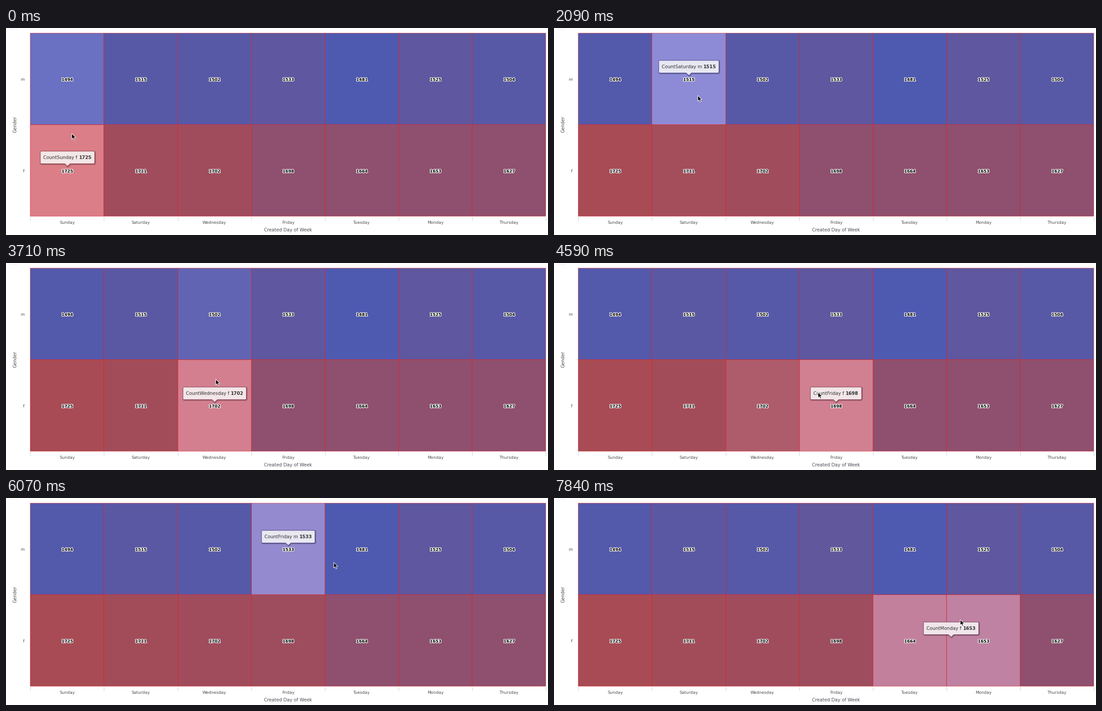
Recreate the animation shown at these times as a matplotlib script. Size 1208 by 463 pixels, loop 7.99 s.

```python
import math

import matplotlib.pyplot as plt
import numpy as np
from matplotlib import patheffects
from matplotlib.animation import FuncAnimation
from matplotlib.patches import Circle, Polygon, Rectangle
from matplotlib.textpath import TextPath

W, H, DPI = 1208, 463, 64
PX = 72 / DPI                      # points per pixel
LOOP, STEPS = 7990, 54             # the screen refreshes 54 times per loop
FRAMES, INTERVAL = 235, 34

DAYS = ["Sunday", "Saturday", "Wednesday", "Friday", "Tuesday", "Monday", "Thursday"]
ROWS = ["m", "f"]
COUNTS = [[1494, 1515, 1502, 1533, 1481, 1525, 1504],
          [1725, 1711, 1702, 1698, 1664, 1653, 1627]]
X0, DX = 54.2, 164.17
XS = np.round(X0 + DX * np.arange(8))
YS = [11.5, 216.3, 421]
RED = "#d8262f"
SIZE_TIP = 10.2
TIP_TOP, ROW_STEP = 72, 205

# pointer travel: start ms, duration ms, x, y
START, BEGIN = np.array([146.0, 190.0]), -500
LEGS = [(-500, 306, 146, 235), (0, 780, 258, 252), (1485, 200, 320, 150),
        (2230, 780, 445, 180), (3040, 530, 467, 259), (3860, 560, 588, 288),
        (4890, 700, 690, 143), (5931, 270, 770, 143), (6330, 700, 800, 258),
        (7455, 420, 907, 271)]
LAG, FADE, TICK = 60, 500, 22      # hover delay, fade-out and tooltip tick in ms
ARROW = np.array([(0, 0), (0, 12.6), (2.9, 9.9), (5, 14.6), (7.1, 13.7),
                  (5.1, 9.2), (9, 9.1)]) + (0.5, 1)


def rgb(code):
    return np.array([int(code[i:i + 2], 16) for i in (1, 3, 5)]) / 255


LOW, HIGH = rgb("#4e5ab0"), rgb("#a84b54")
BANDS, TONES = [0.08, 0.17, 0.5, 0.9], [0, 0.1, 0.19, 0.72, 0.91]


def level(col, row):
    return (COUNTS[row][col] - 1481) / (1725 - 1481)


def shade(amount):
    return LOW + (HIGH - LOW) * amount


def pointer_at(t):
    pos = START
    for begin, span, x, y in LEGS:
        u = min(max((t - begin) / span, 0), 1)
        pos = pos + (np.array([x, y]) - pos) * u * u * (3 - 2 * u)
    return pos


def find_hovers():
    """List (time, col, row) whenever the pointer enters another tile."""
    found = []
    for t in range(BEGIN, LOOP, 5):
        x, y = pointer_at(t)
        tile = (int(np.searchsorted(XS, x)) - 1, int(y > YS[1]))
        if not found or found[-1][1:] != tile:
            found.append((t + LAG, *tile))
    return found


HOVERS = find_hovers()


def mid_x(col):
    return X0 + DX * (col + 0.5) + 0.5


def label(x, y, text, size, colour, ha="center", **kw):
    return ax.text(x, y, text, fontsize=size * PX, color=colour, ha=ha,
                   family="DejaVu Sans", **kw)


def text_width(text, weight):
    prop = {"family": "DejaVu Sans", "weight": weight}
    return TextPath((0, 0), text, size=SIZE_TIP, prop=prop).get_extents().width


def tile_colour(col, row, t):
    """Coarse tone until first hovered, then bright, then fading back."""
    amount, glow = level(col, row), 0
    past = [h for h in HOVERS if h[0] <= t]
    visits = [i for i, h in enumerate(past) if h[1:] == (col, row)]
    if not visits:
        amount = TONES[np.digitize(amount, BANDS)]
    elif visits[-1] == len(past) - 1:
        glow = 1
    else:
        u = min((t - past[visits[-1] + 1][0]) / FADE, 1)
        glow = (1 + math.cos(math.pi * u)) / 2
    return np.clip(shade(amount) + 0.2 * glow, 0, 1)


def tip_centre(t):
    """Each tick covers a third of the way to the hovered tile."""
    pos = None
    ends = [h[0] for h in HOVERS[1:]] + [math.inf]
    for (start, col, row), end in zip(HOVERS, ends):
        if start > t:
            break
        goal = np.array([mid_x(col), TIP_TOP + ROW_STEP * row])
        if pos is None:
            pos = goal
        pos = goal + (pos - goal) * (2 / 3) ** ((min(t, end) - start) // TICK)
    return pos


def callout(x, y, w, h=28, r=1.5):
    right, low, mid = x + w, y + h, x + w / 2
    return np.array([(x + r, y), (right - r, y), (right, y + r), (right, low - r),
                     (right - r, low), (mid + 6, low), (mid, low + 5.5),
                     (mid - 6, low), (x + r, low), (x, low - r), (x, y + r)])


fig = plt.figure(figsize=(W / DPI, H / DPI), dpi=DPI, facecolor="white")
ax = fig.add_axes([0, 0, 1, 1])
ax.set_xlim(0, W)
ax.set_ylim(H, 0)
ax.axis("off")


def line(xs, ys, colour, **kw):
    ax.plot(xs, ys, color=colour, solid_capstyle="butt", **kw)


# tiles and their counts
tiles = {}
for row in range(2):
    for col in range(7):
        tile = Rectangle((XS[col], YS[row]), XS[col + 1] - XS[col],
                         YS[row + 1] - YS[row], lw=0, snap=False, zorder=1)
        tiles[col, row] = ax.add_patch(tile)
        label(mid_x(col), 118.4 + ROW_STEP * row, str(COUNTS[row][col]), 9.2, "black",
              weight="bold", zorder=4,
              path_effects=[patheffects.withStroke(linewidth=2.6 * PX, foreground="white")])

# borders and ticks
border = dict(lw=1.2 * PX, snap=False, zorder=2)
for x in XS:
    line([x, x], [YS[0], YS[2]], RED, alpha=0.9 if XS[0] < x < XS[-1] else 0.55, **border)
    line([x, x], [421.5, 430.5], "#c0d0e0", lw=PX)
for y in YS:
    line([XS[0], XS[-1]], [y, y], RED, alpha=0.9 if y == YS[1] else 0.55, **border)

# axis text
for col, day in enumerate(DAYS):
    label(mid_x(col) - 0.4, 438, day, 9.1, "#505050")
for row, name in enumerate(ROWS):
    label(41.3, 118.3 + ROW_STEP * row, name, 9.1, "#505050", ha="right")
label(628.8, 454.8, "Created Day of Week", 10.1, "#4d4d57")
label(20, 215, "Gender", 10.1, "#4d4d57", va="center", rotation=90)
for i in range(3):
    ax.add_patch(Circle((10.5 + 6 * i, 2.8), 0.7, color="#b4b4b4", lw=0))

# tooltip and pointer
shadows = [ax.add_patch(Polygon([(0, 0), (1, 1)], fill=False, ec="black", alpha=a,
                                lw=w * PX, joinstyle="round", zorder=5))
           for w, a in ((5, 0.07), (3, 0.14), (1, 0.2))]
box = ax.add_patch(Polygon([(0, 0), (1, 1)], lw=PX, zorder=6))
tip_name = label(0, 0, "", SIZE_TIP, "#333333", ha="left", zorder=7)
tip_count = label(0, 0, "", SIZE_TIP, "#333333", ha="left", weight="bold", zorder=7)
pointer = ax.add_patch(Polygon(ARROW, fc="black", ec="white", lw=PX, zorder=9))


def draw_tooltip(t, col, row):
    name, count = f"Count{DAYS[col]} {ROWS[row]}", str(COUNTS[row][col])
    pad, gap = 6.8, 4.2
    name_w = text_width(name, "normal")
    width = round(name_w + gap + text_width(count, "bold") + 2 * pad + 1.5)
    cx, cy = tip_centre(t)
    x, y = math.floor(cx - width / 2) + 0.5, round(cy) + 0.5
    shape = callout(x, y, width)
    for shadow in shadows:
        shadow.set_xy(shape + 1)
    box.set_xy(shape)
    box.set_facecolor((0.976, 0.976, 0.976, 0.85))
    box.set_edgecolor(shade(level(col, row)))
    tip_name.set_text(name)
    tip_name.set_position((x + pad, y + 17.3))
    tip_count.set_text(count)
    tip_count.set_position((x + pad + name_w + gap, y + 17.3))


def update(n):
    step = int((n * INTERVAL + 24) * STEPS / LOOP)
    t = step * LOOP / STEPS
    for (col, row), tile in tiles.items():
        tile.set_facecolor(tile_colour(col, row, t))
    current = [h for h in HOVERS if h[0] <= t][-1]
    draw_tooltip(t, *current[1:])
    pointer.set_xy(ARROW + np.round(pointer_at(t)))
    return []


anim = FuncAnimation(fig, update, frames=FRAMES, interval=INTERVAL, repeat=True,
                     repeat_delay=0, blit=False, cache_frame_data=False)
plt.show()
```
